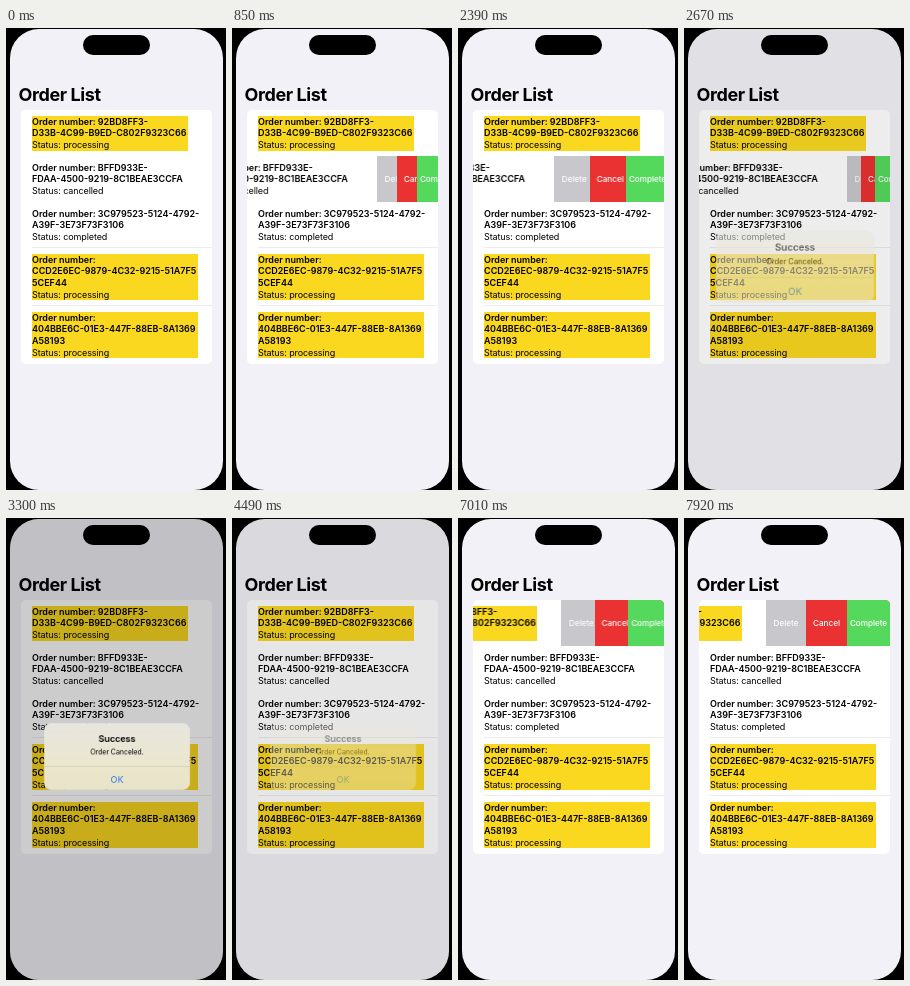
An HTML page that plays this animation: 220x462 px, repeating every 8000 ms.

```html
<!DOCTYPE html>
<html lang="en">
<head>
<meta charset="utf-8">
<title>Order List</title>
<style>
  html, body { margin: 0; width: 100%; height: 100%; overflow: hidden; background: #000; }
  body { font: 9px/11.6px Inter, Roboto, sans-serif; color: #000; }
  .stage { position: relative; width: 220px; height: 462px; overflow: hidden; background: #000; }
  .screen { position: absolute; inset: 1px 3.5px 0 4px; border-radius: 29px; overflow: hidden; background: #f2f1f7; }
  .island { position: absolute; left: 77px; top: 7px; width: 67px; height: 20px; border-radius: 10px; background: #000; }
  h1 { position: absolute; left: 8.5px; top: 55px; margin: 0; font-size: 18px; line-height: 22px; letter-spacing: -.4px; white-space: nowrap; }

  .card { position: absolute; left: 11px; top: 81px; width: 191px; height: 254px; border-radius: 5px; overflow: hidden; background: #fff; }
  .row { position: relative; height: 46px; overflow: hidden; }
  .row.tall { height: 58px; }
  .row.line::after { content: ""; position: absolute; left: 11px; right: 0; bottom: 0; height: 1px; background: #ececef; }
  .text { position: absolute; left: 11px; top: 5.8px; white-space: nowrap; letter-spacing: -.1px; }
  .text b { font-weight: 600; letter-spacing: 0; }
  .processing { background: #fad820; width: 155.5px; }
  .tall .processing { width: 165.5px; }

  .action { position: absolute; left: 191px; top: 0; width: 125px; height: 46px; color: #fff; font-size: 8.1px; font-weight: 500; line-height: 46px; }
  .action span { display: block; text-align: center; }
  .delete { background: #c7c7cc; --shift: -124px; }
  .delete span { width: 40px; }
  .cancel { background: #ea3232; --shift: -84px; }
  .cancel span { width: 41px; }
  .complete { background: #55d95d; --shift: -43px; }
  .complete span { width: 43px; }

  .text { --shift: -124px; }
  .first > * { animation: open-first 8s infinite; }
  .second > * { animation: open-second 8s infinite; }

  .dim { position: absolute; inset: 0; background: rgba(0, 0, 0, .2); animation: dim 8s ease-in-out infinite; }
  .alert { position: absolute; left: 34px; top: 204px; width: 146px; height: 67px; border-radius: 7.5px; overflow: hidden;
    background: linear-gradient(#e6e5df, #ebe7d3 45%, #ebe5c9 75%, #e8e3cc);
    text-align: center; animation: alert 8s ease-in-out infinite; }
  .alert div { position: absolute; left: 0; right: 0; }
  .heading { top: 10px; font-weight: 600; }
  .message { top: 22.5px; font-size: 6.9px; }
  .ok { top: 43px; padding-top: 6.5px; border-top: 1px solid #d8d4c1; color: #2a7ce8; }

  @keyframes open-first {
    0%, 78.875% { transform: none; animation-timing-function: cubic-bezier(.3, .05, 0, 1); }
    99%, 100% { transform: translateX(var(--shift)); }
  }
  @keyframes open-second {
    0%, 6.25% { transform: none; animation-timing-function: cubic-bezier(.3, .05, 0, 1); }
    25.5%, 27.5% { transform: translateX(var(--shift)); animation-timing-function: cubic-bezier(.35, 0, .25, 1); }
    41.25%, 100% { transform: none; }
  }
  @keyframes dim {
    0%, 30.375% { opacity: 0; }
    37.75%, 51.75% { opacity: 1; }
    60.5%, 100% { opacity: 0; }
  }
  @keyframes alert {
    0%, 30.375% { opacity: 0; transform: scale(1.2); animation-timing-function: ease-out; }
    37.75%, 51.75% { opacity: 1; transform: none; }
    59.6%, 100% { opacity: 0; transform: none; }
  }
</style>
</head>
<body>
<div class="stage">
  <div class="screen">
    <h1>Order List</h1>
    <div class="card">
      <div class="row first">
        <div class="text processing"><b>Order number: 92BD8FF3-<br>D33B-4C99-B9ED-C802F9323C66</b><br>Status: processing</div>
        <div class="action delete"><span>Delete</span></div>
        <div class="action cancel"><span>Cancel</span></div>
        <div class="action complete"><span>Complete</span></div>
      </div>
      <div class="row second">
        <div class="text"><b>Order number: BFFD933E-<br>FDAA-4500-9219-8C1BEAE3CCFA</b><br>Status: cancelled</div>
        <div class="action delete"><span>Delete</span></div>
        <div class="action cancel"><span>Cancel</span></div>
        <div class="action complete"><span>Complete</span></div>
      </div>
      <div class="row line">
        <div class="text"><b>Order number: 3C979523-5124-4792-<br>A39F-3E73F73F3106</b><br>Status: completed</div>
      </div>
      <div class="row tall line">
        <div class="text processing"><b>Order number:<br>CCD2E6EC-9879-4C32-9215-51A7F5<br>5CEF44</b><br>Status: processing</div>
      </div>
      <div class="row tall">
        <div class="text processing"><b>Order number:<br>404BBE6C-01E3-447F-88EB-8A1369<br>A58193</b><br>Status: processing</div>
      </div>
    </div>
    <div class="dim"></div>
    <div class="alert">
      <div class="heading">Success</div>
      <div class="message">Order Canceled.</div>
      <div class="ok">OK</div>
    </div>
  </div>
  <div class="island"></div>
</div>
</body>
</html>
```
